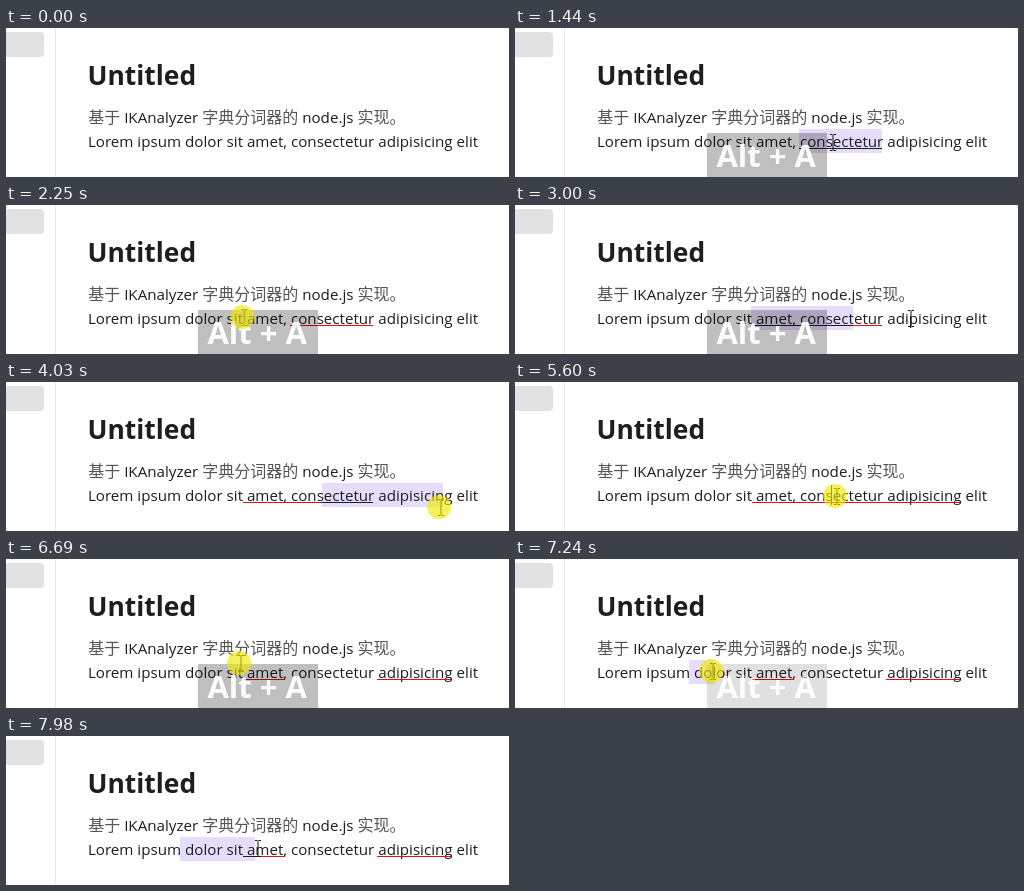
An HTML page that plays this animation: 503x149 px, repeating every 8 s.

```html
<!DOCTYPE html>
<html lang="zh-CN">
<head>
<meta charset="utf-8">
<title>Word underline demo</title>
<style>
html, body { margin: 0; width: 100%; height: 100%; overflow: hidden; background: #fff; }
svg { display: block; width: 503px; height: 149px; }
text { font-family: "Open Sans", "Noto Sans CJK SC", "Noto Sans CJK", sans-serif; fill: #1e1e1e; }
.title { font-size: 26.4px; font-weight: 700; }
.body { font-size: 15.17px; }
.cjk { font-family: "Noto Sans CJK SC", "Noto Sans CJK", sans-serif; font-size: 16px; font-weight: 300; fill: #555; }
.keys text { font-size: 31px; font-weight: 700; fill: #fff; fill-opacity: .95; text-anchor: middle; }

/* 1% = 80 ms; everything holds unless a keyframe asks for a glide */
.sel, .line, .tail, .dark, .keys, .press, .caret { animation: 8s step-end infinite; }
.sel { animation-name: select; }
.line { animation-name: underline; }
.tail { animation-name: tail; }
.dark { animation-name: dark; }
.keys { animation-name: keys; }
.press { animation-name: press; }
.caret { animation-name: caret; }
.mouse { animation: move 8s linear infinite; }

@keyframes select {
  0% { x: 284px; width: 0; }
  12% { x: 284px; width: 83px; }
  22.125% { x: 236px; width: 0; }
  28.125% { x: 236px; width: 0; animation-timing-function: linear; }
  31.5% { x: 236px; width: 102px; }
  40.125% { x: 316px; width: 0; }
  46% { x: 316px; width: 0; animation-timing-function: linear; }
  49.5% { x: 316px; width: 121px; }
  62.875% { x: 284px; width: 0; }
  70.875% { x: 284px; width: 83px; }
  82.875% { x: 174px; width: 0; }
  89.625% { x: 174px; width: 0; animation-timing-function: linear; }
  92.25%, 100% { x: 174px; width: 75px; }
}
@keyframes underline {
  0% { x: 284px; width: 0; }
  17.125% { x: 284px; width: 83px; }
  34.125% { x: 237px; width: 130px; }
  51.875% { x: 237px; width: 208px; }
  76.75%, 100% { x: 237px; width: 42px; }
}
@keyframes tail {
  0% { width: 0; }
  76.75%, 100% { width: 74px; }
}
/* the selected part of the underline takes the text colour */
@keyframes dark {
  0% { x: 284px; width: 0; }
  17.125% { x: 284px; width: 83px; }
  22.125% { x: 237px; width: 0; }
  28.125% { x: 284px; width: 0; }
  29.8% { x: 284px; width: 0; animation-timing-function: linear; }
  31.5% { x: 284px; width: 54px; }
  34.125% { x: 237px; width: 101px; }
  40.125% { x: 316px; width: 0; }
  46% { x: 316px; width: 0; animation-timing-function: linear; }
  47.5% { x: 316px; width: 51px; }
  51.875% { x: 316px; width: 121px; }
  62.875% { x: 284px; width: 0; }
  70.875% { x: 284px; width: 83px; }
  76.75% { x: 237px; width: 0; }
  91.83% { x: 237px; width: 0; animation-timing-function: linear; }
  92.25%, 100% { x: 237px; width: 12px; }
}
@keyframes keys {
  0% { opacity: 0; }
  17.125% { opacity: 1; }
  29% { opacity: 1; animation-timing-function: linear; }
  32.5% { opacity: 0; }
  34.125% { opacity: 1; }
  46% { opacity: 1; animation-timing-function: linear; }
  49.5% { opacity: 0; }
  51.875% { opacity: 1; }
  62.875% { opacity: 1; animation-timing-function: linear; }
  65.75% { opacity: 0; }
  76.75% { opacity: 1; }
  88.75% { opacity: 1; animation-timing-function: linear; }
  92.25%, 100% { opacity: 0; }
}
@keyframes press {
  0%, 11.125%, 12.875%, 23%, 32.25%, 41.125%, 51.25%, 63.875%, 70.4%, 71.75%, 84%, 99.6%, 100% { opacity: 0; }
  10.25%, 12%, 22.125%, 26.375%, 40.125%, 46%, 62.875%, 69.125%, 70.875%, 82.875%, 88.75% { opacity: .65; }
}
@keyframes caret {
  0%, 26.375%, 70.875%, 100% { opacity: 0; }
  22.125%, 62.875% { opacity: 1; }
}
@keyframes move {
  0%, 2.5% { transform: translate(302px, 160px); }
  7.75%, 23% { transform: translate(318px, 114px); }
  23.875%, 28.125% { transform: translate(238px, 112px); }
  31.5%, 33.75% { transform: translate(340px, 113px); }
  37.5%, 41.875% { transform: translate(396px, 113px); }
  42.75%, 46% { transform: translate(318px, 114px); }
  49.5%, 56.25% { transform: translate(435px, 125px); }
  61.875%, 65.75% { transform: translate(316px, 114px); }
  66.625%, 78.5% { transform: translate(322px, 114px); }
  82%, 84.5% { transform: translate(235px, 104px); }
  87.875%, 89.625% { transform: translate(171px, 112px); }
  92.25%, 98.75% { transform: translate(251px, 112px); }
  98.875%, 100% { transform: translate(252px, 112px); }
}
</style>
</head>
<body>
<svg viewBox="0 0 503 149">
  <rect x="-6" y="4" width="44" height="25" rx="4" fill="#e2e2e2"/>
  <rect x="49" width="1" height="149" fill="#e6e6e6"/>

  <rect class="sel" y="101" height="24" fill="#e6dcfb"/>

  <text class="title" x="81.5" y="56.5">Untitled</text>
  <text class="body" x="82.2" y="95"><tspan class="cjk">基于</tspan> IKAnalyzer <tspan class="cjk">字典分词器的</tspan> node.js <tspan class="cjk">实现。</tspan></text>
  <text class="body" x="81.9" y="119">Lorem ipsum dolor sit amet, consectetur adipisicing elit</text>

  <g fill="#d8121c">
    <rect class="line" y="120" height="1"/>
    <rect class="tail" x="371" y="120" height="1"/>
  </g>
  <rect class="dark" y="120" height="1" fill="#1e1e1e"/>
  <rect class="caret" x="316" y="103" width="1" height="20" fill="#222"/>

  <g class="keys">
    <rect x="192" y="105" width="120" height="44" fill="#000" fill-opacity=".25"/>
    <text x="251.2" y="139.3">Alt + A</text>
  </g>

  <g class="mouse">
    <path d="M-3 -7.5h2.5M.5 -7.5h2.5M-3 8.5h2.5M.5 8.5h2.5M0 -7v15" fill="none" stroke="#111"/>
    <circle class="press" cx="-2" r="12" fill="#f2e800"/>
  </g>
</svg>
</body>
</html>
```
